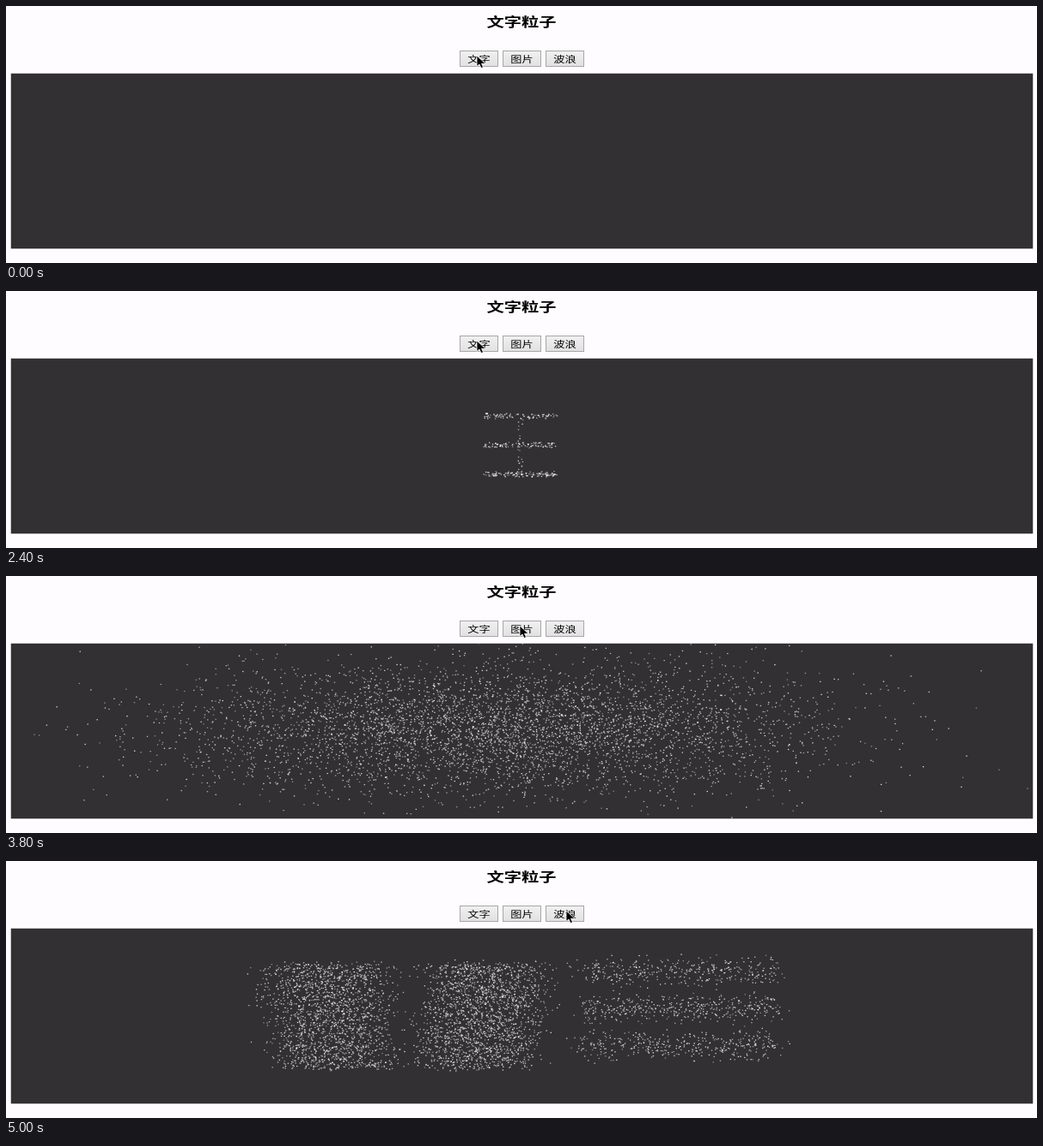
Write an HTML page with a canvas that moves like this. It is 1200 px wide and 300 px high and loops after 5200 ms.

```html
<!DOCTYPE html>
<html lang="zh">
<head>
<meta charset="utf-8">
<style>
html, body { margin: 0; width: 100%; height: 100%; overflow: hidden; background: #fefcfe; }
body { position: relative; font-family: "Noto Sans CJK SC", "Noto Sans CJK", sans-serif; color: #000; }
canvas, h1, nav, svg { position: absolute; left: 0; top: 0; margin: 0; }
h1 { width: 1200px; top: 2px; font-size: 20.3px; line-height: 30px; text-align: center; transform: scaleY(.73); }
nav { left: 528px; top: 52px; display: flex; gap: 5px; }
button {
  width: 45px; height: 19px; padding: 0; box-sizing: border-box;
  border: 1px solid #a8a7a8; border-radius: 0; background: linear-gradient(#f1f0f1, #e2e1e2);
  font: 500 13.2px/17px "Noto Sans CJK SC", "Noto Sans CJK", sans-serif; color: #000;
}
button span { display: block; transform: scaleY(.75); }
svg { overflow: visible; }
</style>
</head>
<body>
<canvas id="stage" width="1200" height="300"></canvas>
<h1>文字粒子</h1>
<nav>
  <button><span>文字</span></button>
  <button><span>图片</span></button>
  <button><span>波浪</span></button>
</nav>
<svg id="cursor" width="12" height="16">
  <path d="M0 0V12.5L3 10L5 14.5L7.5 13.5L5.5 9.3H10Z" stroke="#fff" stroke-width=".8"/>
</svg>
<script>
const LOOP = 5200, STEP = 200;
const TEXT_START = 1400, IMAGE_START = 3200, WAVE_HOVER = 4400;
const PANEL = [5.5, 78.5, 1190, 205];
const CENTER = { x: 600, y: 180 };
const ctx = document.getElementById('stage').getContext('2d');
const cursor = document.getElementById('cursor');

let seed = 20731;
function rnd() {
  seed = (seed + 0x6D2B79F5) | 0;
  let v = Math.imul(seed ^ (seed >>> 15), 1 | seed);
  v = (v + Math.imul(v ^ (v >>> 7), 61 | v)) ^ v;
  return ((v ^ (v >>> 14)) >>> 0) / 4294967296;
}
const spread = () => rnd() * 2 - 1;
const bell = () => spread() + spread() + spread();

// Three bars joined by a thin stem
function textPoint() {
  if (rnd() < .1) return { x: 599 + spread() * 3, y: 180 + spread() * 34 };
  const bar = Math.floor(rnd() * 3);
  return { x: 599 + spread() * 43, y: 146 + 34 * bar + spread() * 3 };
}

// Two blocks that lean together at the bottom, then three loose bands
function picturePoint() {
  if (rnd() < .75) {
    const side = rnd() < .47 ? -1 : 1, depth = rnd();
    return {
      x: 462 + side * (97 - 14 * depth) + (spread() + spread() * .4) * 60,
      y: 118 + depth * 126
    };
  }
  const band = Math.floor(rnd() * 3);
  return { x: 788 + spread() * 118, y: 128 + 44 * band + bell() * 8 };
}

function makeDots(count, targetPoint, noise, width, height) {
  return Array.from({ length: count }, () => {
    const { x, y } = targetPoint();
    return {
      tx: x - CENTER.x, ty: y - CENTER.y,
      sx: noise() * width, sy: noise() * height,
      near: rnd() ** 40, alpha: .4 + rnd() * .45
    };
  });
}
const textDots = makeDots(340, textPoint, spread, 590, 102);
const imageDots = makeDots(5000, picturePoint, bell, 330, 66);

// scatter: how much disorder is left, blow: how close the cloud is to the viewer
function drawDots(dots, scatter, blow, wobble) {
  const hold = Math.max(0, 1 - scatter);
  ctx.fillStyle = '#fff';
  dots.forEach((dot, i) => {
    const x = CENTER.x + dot.tx * hold + dot.sx * scatter + Math.sin(i * 2.4 + wobble) * .5;
    const y = CENTER.y + dot.ty * hold + dot.sy * scatter + Math.cos(i * 1.7 + wobble) * .4;
    const size = 1.4 + blow * (dot.near * 5 - .3);
    ctx.globalAlpha = dot.alpha * (1 - .55 * blow);
    if (size < 2) {
      ctx.fillRect(x - size / 2, y - size / 2, size, size * .9);
    } else {
      ctx.beginPath();
      ctx.arc(x, y, size / 2, 0, 7);
      ctx.fill();
    }
  });
}

function cursorX(t) {
  if (t < IMAGE_START) return 548;
  if (t < WAVE_HOVER) return 598;
  return Math.min(652, 620 + (t - WAVE_HOVER) * .11);
}

function render(t) {
  ctx.globalAlpha = 1;
  ctx.clearRect(0, 0, 1200, 300);
  ctx.save();
  ctx.beginPath();
  ctx.rect(...PANEL);
  ctx.clip();
  ctx.fillStyle = '#323032';
  ctx.fillRect(...PANEL);
  if (t >= IMAGE_START) {
    const scatter = 2.1 * .62 ** ((t - IMAGE_START) / STEP);
    drawDots(imageDots, scatter, Math.max(0, (scatter - .5) / 1.6), 0);
  } else if (t >= TEXT_START) {
    const scatter = .2 ** ((t - TEXT_START) / STEP);
    drawDots(textDots, scatter, scatter, t / STEP * 2);
  }
  ctx.restore();
  cursor.style.transform = `translate(${cursorX(t)}px, 58px)`;
}

const start = performance.now();
let shown = -1;
function tick() {
  const elapsed = Math.max(0, performance.now() - start) % LOOP;
  const t = Math.floor(elapsed / STEP) * STEP;
  if (t !== shown) render(shown = t);
  requestAnimationFrame(tick);
}
tick();
</script>
</body>
</html>
```
